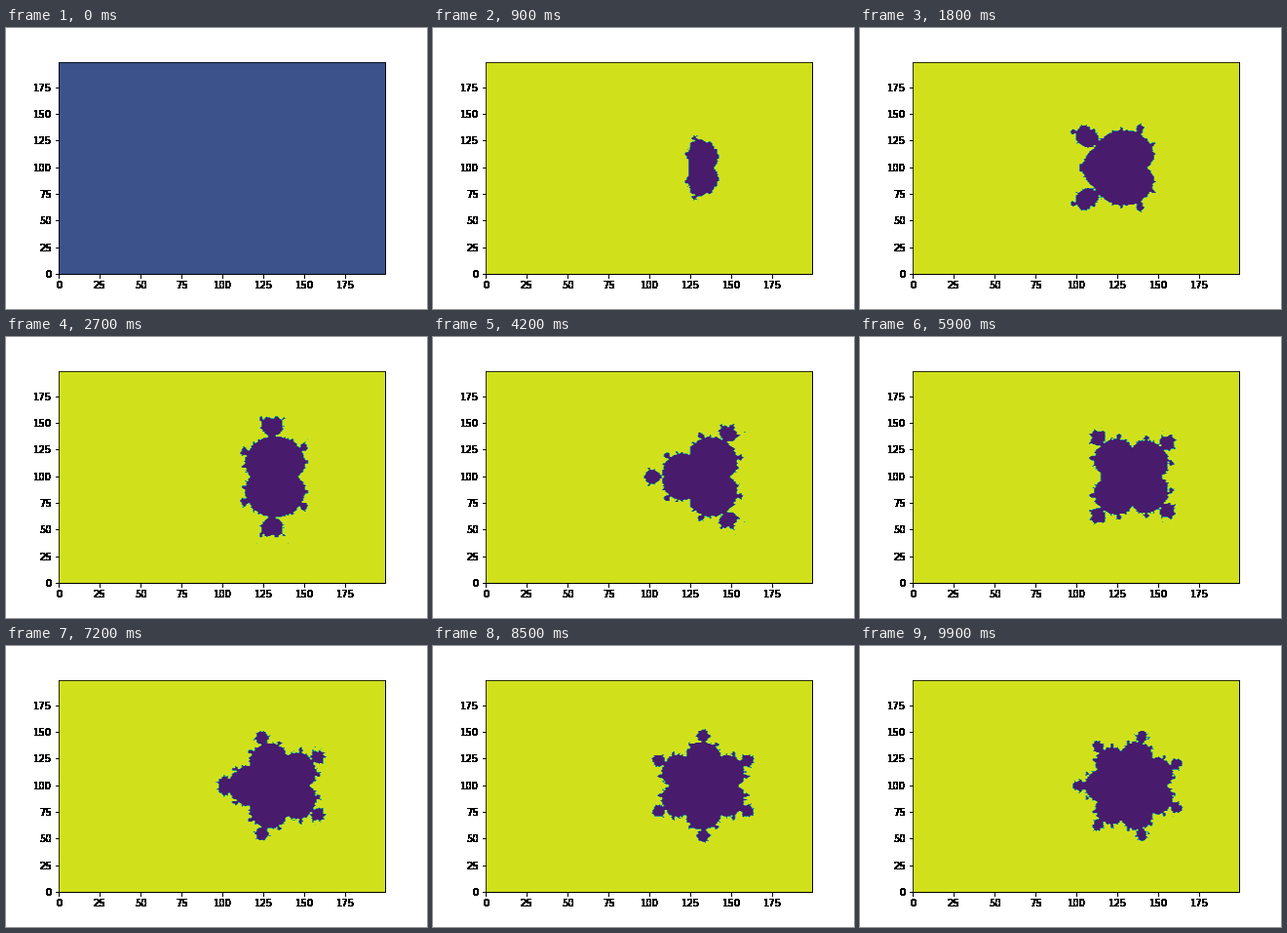
Recreate the animation shown at these times as a matplotlib script. Size 432 px wide and 288 px high, loop 10000 ms.

```python
import matplotlib.pyplot as plt
import numpy as np
from matplotlib.animation import FuncAnimation

FRAMES, SIZE, STEPS = 100, 200, 200

re = np.linspace(-4, 2, SIZE)
im = np.linspace(-2, 2, SIZE)[SIZE // 2:]
grid = (re[None, :] + 1j * im[:, None]).ravel()


def multibrot(power):
    """1 where z -> z**power + c escapes, 0 where it stays bounded."""
    escaped = np.ones(grid.size)
    alive = np.arange(grid.size)
    c = z = grid
    for _ in range(STEPS):
        keep = np.abs(z) <= 2
        if not keep.all():
            alive, c, z = alive[keep], c[keep], z[keep]
        if not alive.size:
            break
        z = z ** power + c
    escaped[alive[np.abs(z) <= 2]] = 0
    upper = escaped.reshape(len(im), SIZE)
    return np.vstack([upper[::-1], upper])


def harden(img, dpi):
    """Turn every touched pixel solid black."""
    img[..., :3] = 0
    img[..., 3] = img[..., 3] > 0
    return img, 0, 0


fields = [multibrot(p) for p in np.linspace(1, 8, FRAMES)]

fig = plt.figure(figsize=(6, 4), dpi=72, facecolor="white")
ax = fig.add_axes([0.125, 0.125, 0.775, 0.755])
ax.set(xlim=(0, SIZE - 1), ylim=(0, SIZE - 1))
for part in (ax.xaxis, ax.yaxis, ax.spines.right, ax.spines.bottom):
    part.set_agg_filter(harden)


def update(i):
    for old in list(ax.collections):
        old.remove()
    field = fields[i]
    if np.ptp(field) == 0:
        ax.contourf(field, levels=[0, 1, 2])
    else:
        ax.contourf(field, levels=np.arange(8) * 0.15)
    return ax.collections


anim = FuncAnimation(fig, update, frames=FRAMES, interval=100,
                     repeat=True, repeat_delay=0, blit=False)
plt.show()
```
